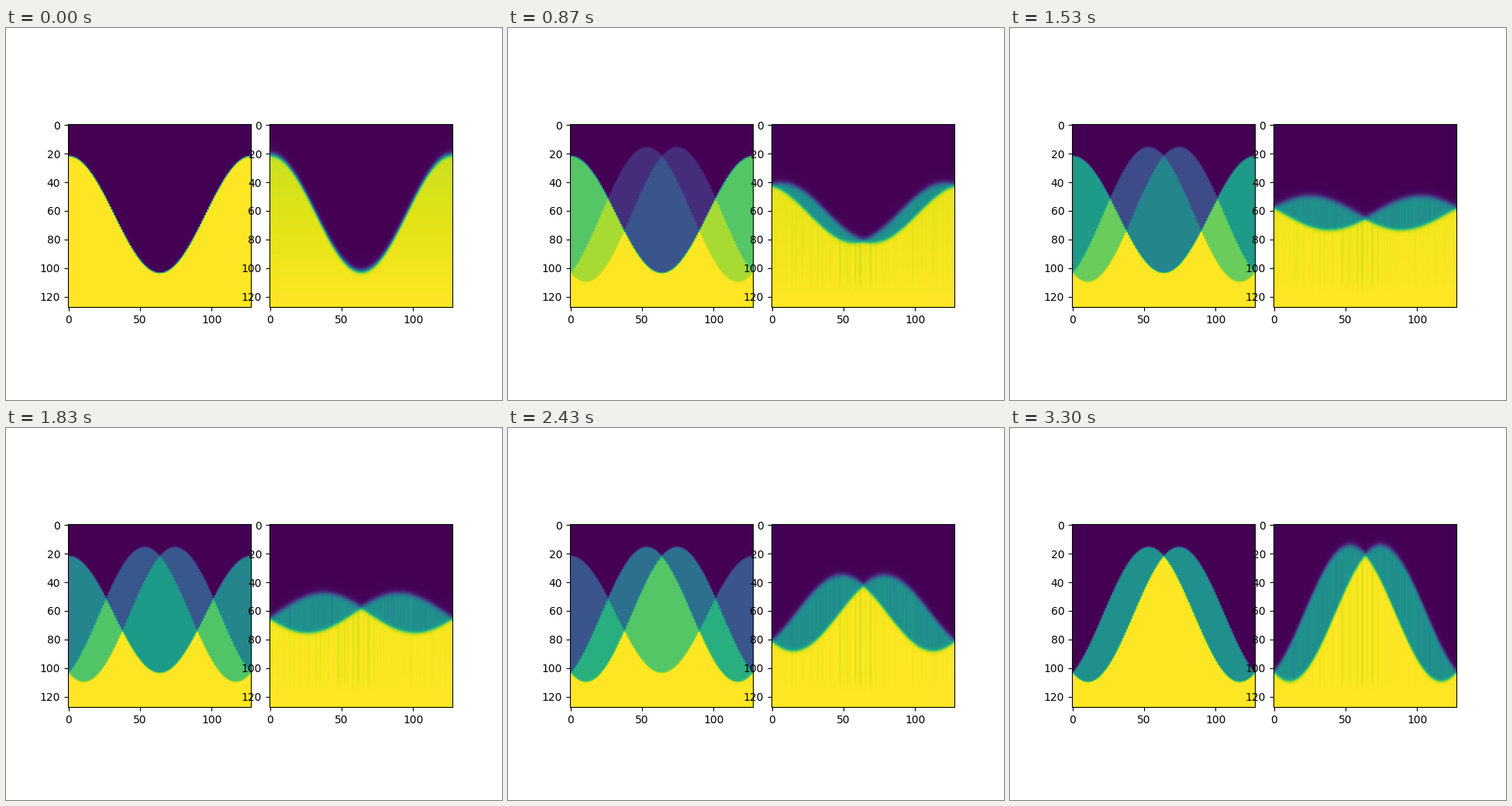
Animation, 640 px wide and 480 px high, one loop 3.33 s. Source, as a matplotlib script:

```python
import numpy as np
import matplotlib.pyplot as plt
from matplotlib.animation import FuncAnimation

N = 128
FRAMES = 100
MID, AMP, PHASE = 63.0, 47.0, np.pi / 6

theta = np.linspace(0, 2 * np.pi, N)
rows = np.arange(N)[:, None]

# One boundary on the start side, two phase-shifted ones on the end side
start = MID - AMP * np.cos(PHASE) * np.cos(theta)
ends = [MID + AMP * np.cos(theta + s * PHASE) for s in (-1, 1)]

rng = np.random.default_rng(4)
stripes = rng.random(N) ** 4
stripes *= 0.25 + 0.75 * np.exp(-((np.arange(N) - 64) / 28) ** 2)
grain = rng.normal(0, 0.012, N)


def below(edge):
    return np.clip(rows - edge + 0.5, 0, 1)


def soft_below(edge, width):
    return 0.5 * (1 + np.tanh((rows - edge) / width))


def blend(t):
    return (1 - t) * below(start) + t * 0.5 * sum(below(e) for e in ends)


def transport(t):
    moved = [(1 - t) * start + t * e for e in ends]
    top = np.minimum(*moved) - 1.7 + 0.6 * t
    bottom = np.maximum(*moved) - 0.5
    upper = soft_below(top, 1.9)
    lower = soft_below(bottom, 1.4)
    field = 0.5 * (upper + lower)

    # Mass is a little thin just under the boundary, with column streaks
    depth = np.clip((N - 1 - rows) / 105, 0, 1)
    fade = np.clip((118 - rows) / 12, 0, 1)
    streak = 0.06 * min(1, 4 * t) * stripes * fade
    field -= lower * (0.08 * (1 - t) ** 2 * depth + streak)
    field += (upper - lower) * grain * min(1, 2 * t)
    field += (1 - upper) * 0.015 * np.exp(-np.abs(top - rows) / 8)
    return np.clip(field, 0, 1)


fig, axes = plt.subplots(1, 2, figsize=(6.4, 4.8), dpi=100,
                         gridspec_kw={"wspace": 0.1})
views = (blend, transport)
images = [ax.imshow(view(0), vmin=0, vmax=1, cmap="viridis")
          for ax, view in zip(axes, views)]


def update(i):
    t = i / (FRAMES - 1)
    for image, view in zip(images, views):
        image.set_data(view(t))
    return images


anim = FuncAnimation(fig, update, frames=FRAMES, interval=33.3,
                     repeat=True, repeat_delay=0, blit=False)
plt.show()
```
